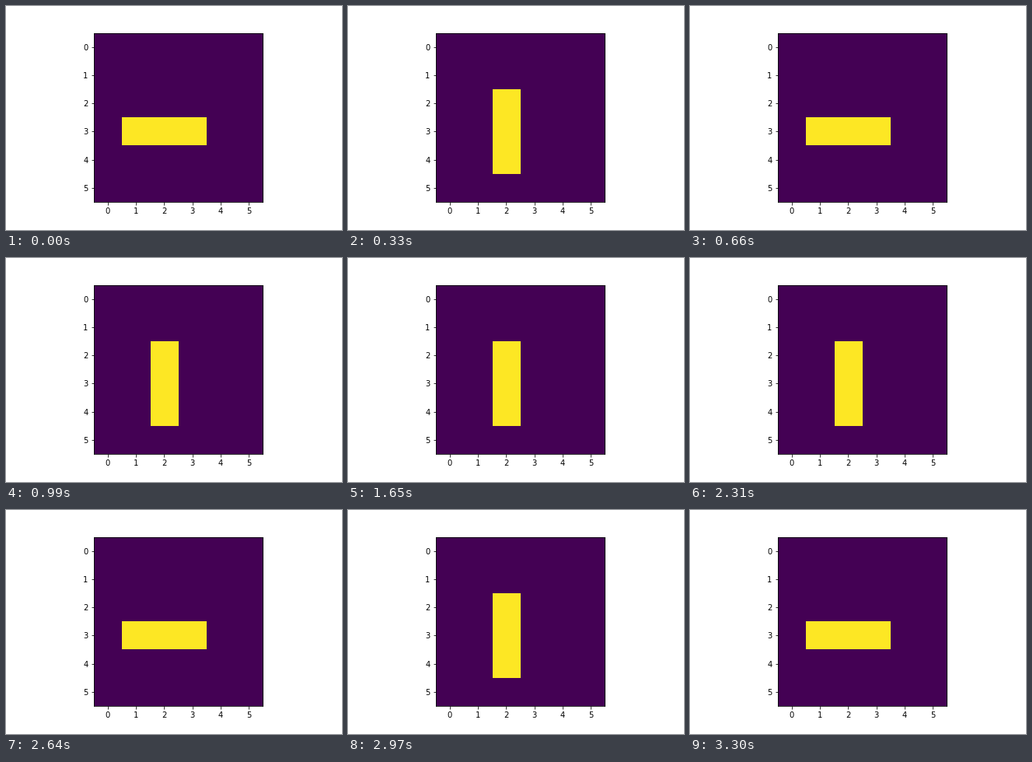
Write a matplotlib script that moves like this. It is 432x288 px and loops after 3630 ms.

```python
import matplotlib.pyplot as plt
import numpy as np
from matplotlib.animation import FuncAnimation

SIZE = 6
FRAMES = 11
INTERVAL = 330


def step(board):
    """Advance the Game of Life by one generation."""
    shifts = [(dy, dx) for dy in (-1, 0, 1) for dx in (-1, 0, 1) if dy or dx]
    neighbours = sum(np.roll(board, s, axis=(0, 1)) for s in shifts)
    alive = (neighbours == 3) | ((board == 1) & (neighbours == 2))
    return alive.astype(int)


def generations(board, count):
    boards = [board]
    while len(boards) < count:
        boards.append(step(boards[-1]))
    return boards


start = np.zeros((SIZE, SIZE), dtype=int)
start[3, 1:4] = 1
boards = generations(start, FRAMES)

fig, ax = plt.subplots(figsize=(6, 4), dpi=72, facecolor="white")
fig.subplots_adjust(left=0.125, right=0.9, bottom=0.125, top=0.88)
image = ax.imshow(start, cmap="viridis", vmin=0, vmax=1, interpolation="nearest")
ax.set_xticks(range(SIZE))
ax.set_yticks(range(SIZE))


def update(i):
    image.set_data(boards[i])
    return [image]


anim = FuncAnimation(fig, update, frames=FRAMES, interval=INTERVAL,
                     repeat=True, repeat_delay=0)
plt.show()
```
